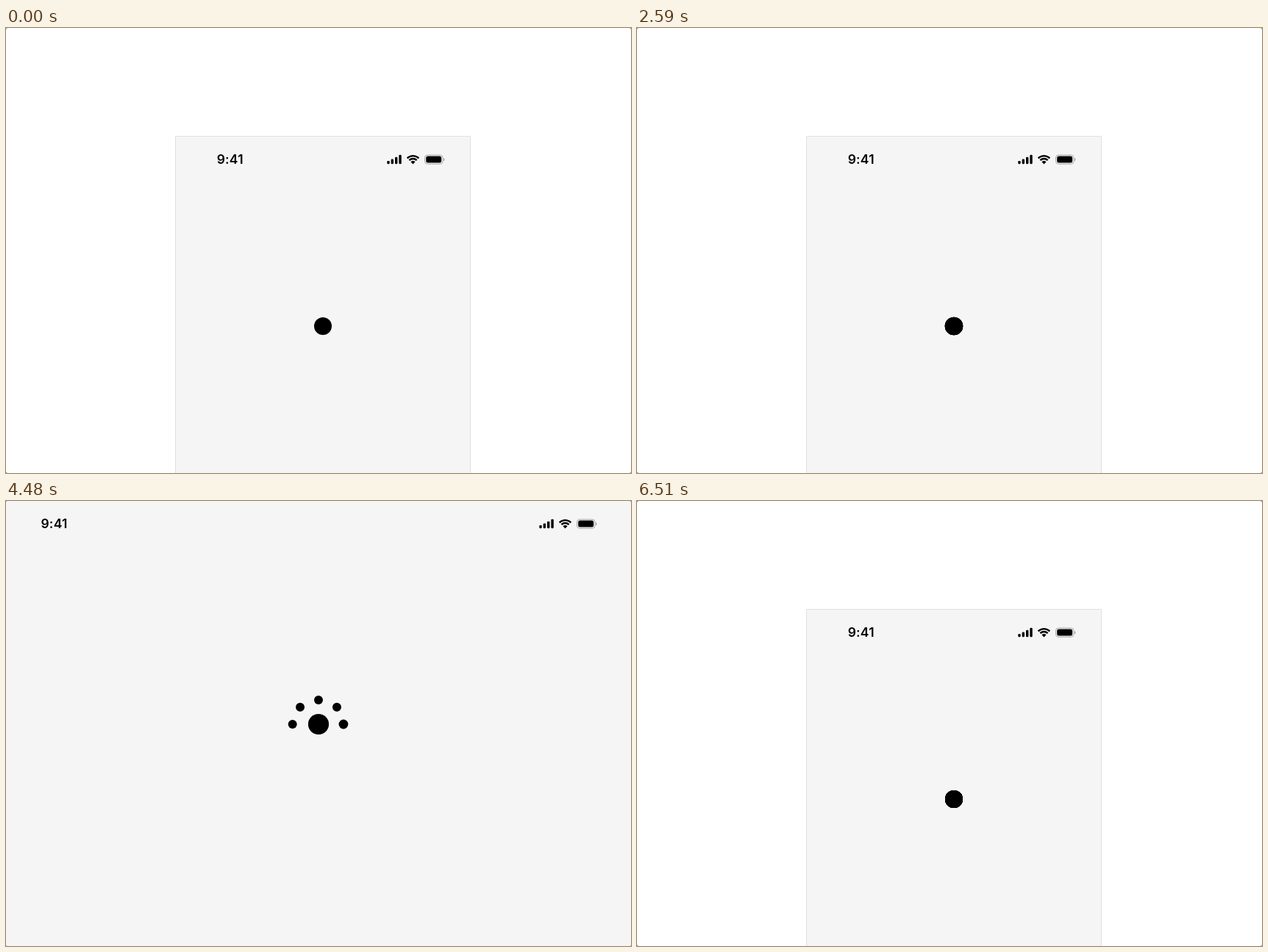
An HTML page with a canvas for the animation above (6790 ms loop, 850x606 px).

```html
<!DOCTYPE html>
<html lang="en">
<head>
<meta charset="utf-8">
<title>Resizing screen with loader</title>
<style>
html, body { margin: 0; width: 100%; height: 100%; overflow: hidden; background: #fff; }
canvas { display: block; }
</style>
</head>
<body>
<canvas id="stage" width="850" height="606"></canvas>
<script>
const W = 850, H = 606, LOOP = 6790, TICK = 70;
const STEP = 208, DOTS = 8, MERGE = 700, RESIZE = 352;
const ctx = document.getElementById('stage').getContext('2d');

const clamp = x => Math.min(1, Math.max(0, x));
const lerp = (a, b, p) => a + (b - a) * p;
const easeOut = x => 1 - (1 - x) ** 3;

function bezier(x1, y1, x2, y2) {
  const at = (a, b, s) => 3 * a * s * (1 - s) ** 2 + 3 * b * s * s * (1 - s) + s ** 3;
  return x => {
    x = clamp(x);
    if (x === 0 || x === 1) return x;
    let lo = 0, hi = 1;
    for (let i = 0; i < 30; i++) {
      const mid = (lo + hi) / 2;
      if (at(x1, x2, mid) < x) lo = mid; else hi = mid;
    }
    return at(y1, y2, lo);
  };
}
const easeResize = bezier(0.35, 0.07, 0.3, 1);
const easeBack = bezier(0.45, 1.45, 0.8, 1);

function disc(x, y, r) {
  ctx.beginPath();
  ctx.arc(x, y, Math.max(0, r), 0, 2 * Math.PI);
  ctx.fill();
}

function pill(x, y, w, h, r) {
  ctx.beginPath();
  ctx.roundRect(x, y, w, h, r);
}

function drawScreen(small) {
  const snap = x => Math.round(x) + 0.5;
  const left = snap(lerp(-1, 230, small));
  const right = snap(lerp(850, 631, small));
  const top = snap(lerp(-1, 147, small));
  ctx.fillStyle = '#f5f5f5';
  ctx.strokeStyle = '#e0e0e0';
  ctx.lineWidth = 1;
  ctx.beginPath();
  ctx.rect(left, top, right - left, H + 10 - top);
  ctx.fill();
  ctx.stroke();
}

function drawStatus(small) {
  const y = lerp(31, 179, small);
  ctx.fillStyle = ctx.strokeStyle = '#000';
  ctx.font = '600 17.5px Inter, "Liberation Sans", sans-serif';
  ctx.letterSpacing = '0.2px';
  ctx.textAlign = 'center';
  ctx.fillText('9:41', lerp(65.5, 304.7, small), y + 6.2);

  ctx.save();
  ctx.translate(lerp(725, 518, small), y);
  [4.2, 6.6, 9.4, 12.4].forEach((h, i) => {
    pill(0.3 + i * 5.35, 6.2 - h, 3.4, h, 1.1);
    ctx.fill();
  });

  // Wi-Fi fan
  const from = -0.75 * Math.PI, to = -0.25 * Math.PI;
  ctx.lineWidth = 2.4;
  for (const r of [11.1, 7.2]) {
    ctx.beginPath();
    ctx.arc(35.5, 6.2, r, from, to);
    ctx.stroke();
  }
  ctx.beginPath();
  ctx.moveTo(35.5, 6.4);
  ctx.arc(35.5, 6.2, 4.3, from, to);
  ctx.fill();

  // Battery
  ctx.strokeStyle = ctx.fillStyle = '#a6a6a6';
  ctx.lineWidth = 1;
  pill(51.5, -6, 24.5, 12.2, 3.8);
  ctx.stroke();
  pill(77, -1.8, 1.4, 4, [0, 1.4, 1.4, 0]);
  ctx.fill();
  ctx.fillStyle = '#000';
  pill(53.2, -4.4, 21, 9, 2.5);
  ctx.fill();
  ctx.restore();
}

function drawLoader(time, small) {
  const x = lerp(425, 431, small), y = lerp(304, 406, small);
  const full = lerp(24, 12, small), dot = lerp(6, 3.05, small);
  const rx = lerp(35.3, 18, small), ry = lerp(33, 17, small);

  const k = clamp(time / (STEP * DOTS)) * DOTS;
  const n = Math.floor(k), part = easeOut(k - n), count = n + part;
  const merge = easeBack((time - STEP * DOTS) / MERGE);
  const core = c => lerp(full * (1 - Math.min(c, 7) / 12), dot, clamp(c - 7));

  const shade = clamp(count - 7) * clamp(1 - merge);
  ctx.save();
  ctx.fillStyle = '#000';
  ctx.shadowColor = `rgba(0,0,0,${0.09 * shade})`;
  ctx.shadowBlur = full / 6;
  ctx.shadowOffsetY = full / 6;
  for (let i = 0; i < DOTS && i < count; i++) {
    const out = i < n ? 1 : part;
    const angle = Math.PI * (1 + i / 4);
    const reach = out * (1 - merge);
    disc(x + rx * reach * Math.cos(angle), y + ry * reach * Math.sin(angle),
      lerp(lerp(core(i), dot, out), full, merge));
  }
  disc(x, y, lerp(core(count), full, merge));
  ctx.restore();
}

function draw(t) {
  const small = 1 - easeResize((t - 2705) / RESIZE) + easeResize((t - 6135) / RESIZE);
  ctx.fillStyle = '#666';
  ctx.fillRect(0, 0, W, H);
  ctx.save();
  pill(0, 0, W, H, 2.5);
  ctx.clip();
  ctx.fillStyle = '#fff';
  ctx.fillRect(0, 0, W, H);
  drawScreen(small);
  drawStatus(small);
  drawLoader(t < 3300 ? t - 268 : t - 3510, small);
  ctx.restore();
}

const start = performance.now();
function frame() {
  const t = (performance.now() - start) % LOOP;
  draw(Math.floor(t / TICK) * TICK);
  requestAnimationFrame(frame);
}
frame();
</script>
</body>
</html>
```
